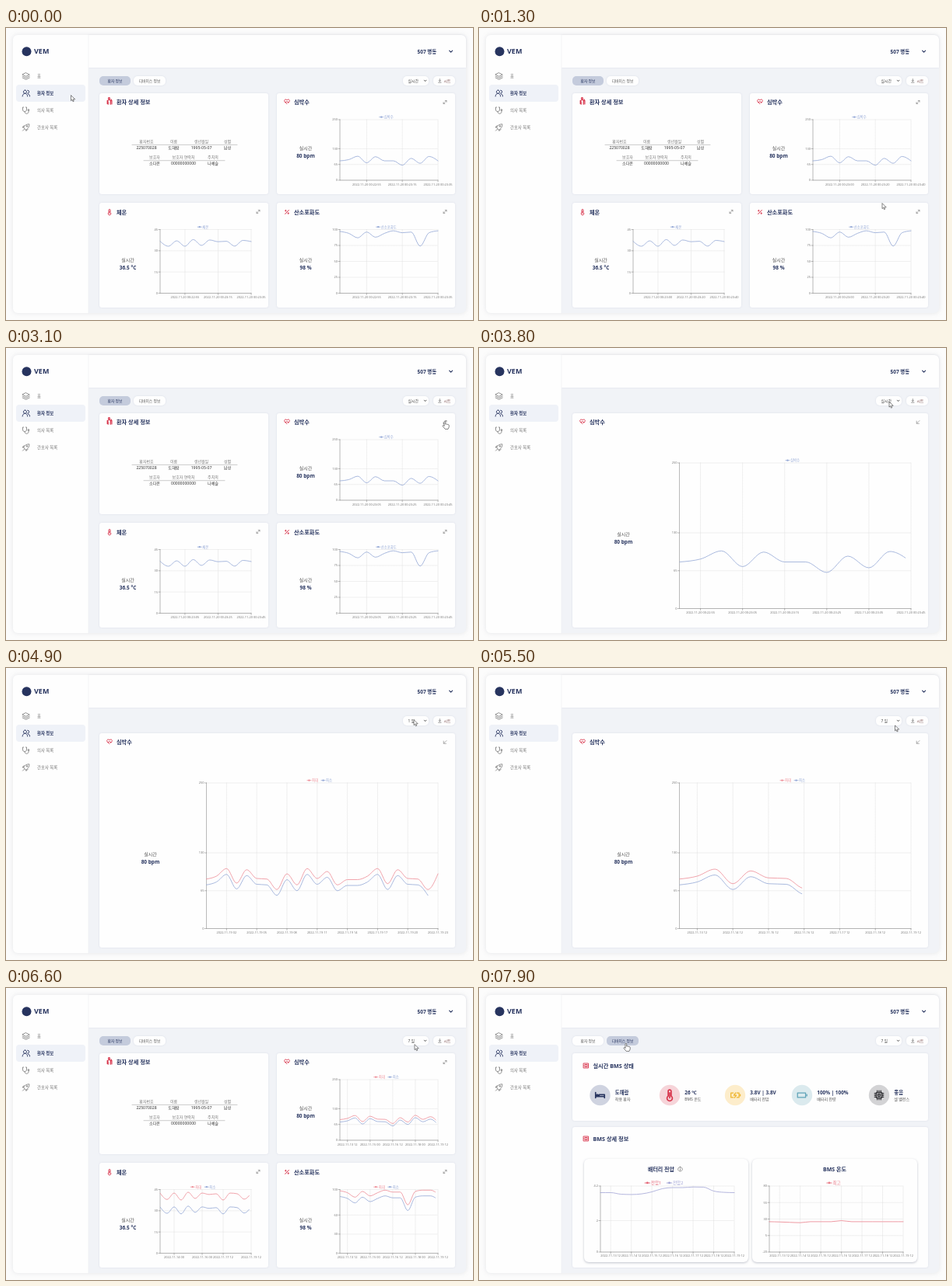
An HTML page that plays this animation: 600 px wide and 376 px high, repeating every 8000 ms.

```html
<!DOCTYPE html>
<html lang="ko">
<head>
<meta charset="utf-8">
<title>병동 모니터링</title>
<style>
  html, body { margin: 0; width: 100%; height: 100%; overflow: hidden; background: #fcfcfc; }
  svg { display: block; width: 100vw; height: 100vh; }
  text { font-family: "Noto Sans", "Noto Sans CJK KR", "Noto Sans CJK", sans-serif; }
  .card { fill: #fefefe; filter: drop-shadow(0 .4px 1px rgba(70, 85, 130, .13)); }
  .inner { fill: #fefefe; filter: drop-shadow(0 1px 1.6px rgba(50, 60, 90, .3)); }
  .window { filter: drop-shadow(0 0 3px rgba(60, 70, 90, .13)); }
  .line { fill: none; stroke-linecap: round; stroke-linejoin: round; }
</style>
</head>
<body>
<svg id="stage" viewBox="0 0 600 376"></svg>
<script>
const LOOP = 8000, STEP = 100;
const NAVY = '#27345f', GRAY = '#777', RED = '#d8354c', BLUE = '#94a8d6', PINK = '#ee8d97';
const PATIENT = '도해람', GUARDIAN = '소다온', DOCTOR = '나예슬';

// Times at which the page content changes
const ZOOM_IN = 3200, PICK_DAY = 4100, PICK_WEEK = 5300, ZOOM_OUT = 6000, DEVICE = 7800;
const DRAW_MS = 750;

const HEART = {
  name: '심박수', unit: '80 bpm', max: 250, ticks: [0, 65, 130, 250], gap: 10,
  live: [80, 85, 99, 72, 97, 80, 80, 62, 90, 70, 98, 80],
  day: [85, 90, 103, 78, 101, 86, 85, 67, 94, 75, 103, 86, 98, 75, 84, 84, 90, 103, 77, 101, 86, 85, 67, 94],
  week: [85, 90, 102, 77, 99, 87, 86, 69, 93, 75, 103, 86, 97, 74]
};
const TEMP = {
  name: '체온', unit: '36.5 °C', max: 45, ticks: [0, 15, 30, 45], gap: 9.8,
  live: [36.7, 33.2, 37, 33.2, 37.9, 33.8, 37.6, 36.4, 36.7, 33.3, 37.3, 36.5],
  week: [42.5, 38, 42.5, 37.6, 43.1, 38.7, 42.5, 41.5, 42, 37.6, 42.5, 42, 38.2, 42.5]
};
const OXYGEN = {
  name: '산소포화도', unit: '98 %', max: 100, ticks: [0, 25, 50, 75, 100], weekTicks: [0, 30, 60, 100], gap: 9,
  live: [97, 94, 87, 96, 88, 94, 98, 95, 96, 74, 95, 98],
  week: [98, 95, 88, 97, 90, 95, 99, 96, 96, 76, 97, 99, 99, 93]
};
const VOLTAGE = [3.78, 3.78, 3.68, 3.66, 3.7, 3.83, 4.03, 4.1, 4.1, 4.14, 4.13, 3.88, 3.8, 3.78];
const DEVICE_TEMP = [26, 25.6, 25, 24.5, 26, 26, 26, 27.6, 26, 26, 26, 26, 26, 26];

const pad = n => String(n).padStart(2, '0');
const every = (from, step, to) => Array.from({ length: Math.floor((to - from) / step) + 1 }, (_, i) => from + i * step);
const text = (x, y, str, size, { fill = GRAY, anchor = 'start', weight = 400 } = {}) =>
  `<text x="${x}" y="${y}" font-size="${size}" fill="${fill}" text-anchor="${anchor}" font-weight="${weight}">${str}</text>`;
const mid = (x, y, str, size, fill = GRAY, weight = 400) => text(x, y, str, size, { fill, weight, anchor: 'middle' });
const bold = (x, y, str, size) => text(x, y, str, size, { fill: NAVY, weight: 700 });
const rect = (x, y, w, h, r, attrs) => `<rect x="${x}" y="${y}" width="${w}" height="${h}" rx="${r}" ${attrs}/>`;
const card = (x, y, w, h) => rect(x, y, w, h, 3, 'class="card"');
const stroke = (d, color, width = .8, extra = '') => `<path class="line" d="${d}" stroke="${color}" stroke-width="${width}" ${extra}/>`;
const at = (x, y, body, scale = 1) => `<g transform="translate(${x} ${y}) scale(${scale})">${body}</g>`;

const ICON = {
  layers: c => stroke('M0-4.2L4.5-2 0 .3-4.5-2ZM-4.5 0L0 2.3 4.5 0M-4.5 2L0 4.3 4.5 2', c),
  users: c => stroke('M-1.2-4a2.1 2.1 0 1 1-.1 0M-4.6 4c0-5 6.6-5 6.6 0M2-3.8a2 2 0 0 1 0 4M2.8 1c1.4.3 2 1.4 2 3', c, .9),
  scope: c => stroke('M-3-4h-1.2v3c0 3.6 5 3.6 5 0v-3h-1.2M-1.7 1.8c0 3.6 5 3.2 5 0v-1.2M3.3-1.2a.9.9 0 1 1-.1 0', c),
  rocket: c => stroke('M-1.8 1.8L-3-.2C-1-3.4 1.2-4.2 4.2-4.2 4.2-1.2 3.4 1 .2 3ZM-3-.2l-1.6.2L-2.6-2.4M.2 3v1.6L2.4 2.4M-2.4 2.4L-4.2 4.2M1.4-2.2a.8.8 0 1 1-.1 0', c),
  patient: c => stroke('M-.6-3.4a1 1 0 1 1 .1 0M-1.8 3.2v-2.4l-.6-2.4 2-1.2 2 1.2-.4 2.4v2.4M2-3l.9 1.6v4.4M-2.8-1.6v4', c, 1.2),
  heart: c => stroke('M0 2.8L-3-.2c-1.4-2 1.4-4 3-1.8 1.6-2.2 4.4-.2 3 1.8L1.4 1.4M-2.4.4h1.6l.8-1 .8 1.2h1.2', c, .9),
  thermo: c => stroke('M-1 .6v-3.2a1 1 0 0 1 2 0v3.2a1.8 1.8 0 1 1-2 0M0-1.6v3.4', c, .9),
  percent: c => stroke('M2.3-2.5L-2.3 2.5M-1.6-2.4a.7.7 0 1 1-.1 0M1.7 1a.7.7 0 1 1-.1 0', c, 1),
  list: c => stroke('M-3-3h6v6h-6ZM-3 0h6M-1.5-1.5h3M-1.5 1.5h3', c, .9),
  expand: () => stroke('M-2 2L2-2M.2-2H2v1.8M-2 .2V2h1.8', '#777', .6),
  collapse: () => stroke('M2-2L-1.4 1.4M-1.8-1.4v3.2h3.2', '#777', .6),
  bed: c => stroke('M-5-3v6M-5 1.4h10M5 3v-3.6H-1V1.4M-3-.7a.8.8 0 1 1-.1 0', c, 1.4),
  bolt: c => stroke('M-2-2.6h-2.6v5.2H-2M2-2.6h2.4v5.2H2M5.7-.8v1.6M.6-2.6L-1.4.2h2.8L-.6 2.8', c, 1.1),
  battery: c => stroke('M-5-2.6h9v5.2h-9ZM5.4-.8v1.6', c, 1.1),
  chip: c => stroke('M-3-3h6v6h-6ZM-1.2-1.2h2.4v2.4h-2.4ZM-2-5v2M0-5v2M2-5v2M-2 5v-2M0 5v-2M2 5v-2M-5-2h2M-5 0h2M-5 2h2M5-2h-2M5 0h-2M5 2h-2', c, 1.1)
};
const icon = (name, x, y, color, scale) => at(x, y, ICON[name](color), scale);

// Monotone cubic through evenly spaced points
function smooth(points) {
  const h = points[1][0] - points[0][0], n = points.length;
  const s = points.slice(1).map((p, i) => (p[1] - points[i][1]) / h);
  const m = points.map((_, i) => {
    if (!i || i === n - 1) return 0;
    const a = s[i - 1], b = s[i];
    return (Math.sign(a) + Math.sign(b)) * Math.min(Math.abs(a), Math.abs(b), Math.abs(a + b) / 4);
  });
  m[0] = (3 * s[0] - m[1]) / 2;
  m[n - 1] = (3 * s[n - 2] - m[n - 2]) / 2;
  const f = v => v.toFixed(2);
  return points.reduce((d, [x, y], i) => {
    if (!i) return `M${f(x)} ${f(y)}`;
    const [px, py] = points[i - 1];
    return d + `C${f(px + h / 3)} ${f(py + m[i - 1] * h / 3)} ${f(x - h / 3)} ${f(y - m[i] * h / 3)} ${f(x)} ${f(y)}`;
  }, '');
}

function legend(center, y, series, size) {
  const k = size / 4.4, widths = series.map(s => (6 + s.name.length * 4.05) * k);
  let x = center - (widths.reduce((a, b) => a + b) + (series.length - 1) * 4 * k) / 2;
  return series.map((s, i) => {
    const item = at(x, y - 1.6 * k, stroke('M0 0h5', s.color, .8) + `<circle cx="2.5" r="1.1" fill="${s.color}"/>`, k) +
      text(x + 6 * k, y, s.name, size, { fill: s.color });
    x += widths[i] + 4 * k;
    return item;
  }).join('');
}

function chart({ x, y, w, h, min = 0, max, ticks, series, count, xTicks, label, reveal = 1, legendY, legendSize = 4.4, labelGap = 6.8 }) {
  const px = i => x + i * w / (count - 1), py = v => y + h - (v - min) / (max - min) * h;
  const grid = ticks.map(v => `M${x} ${py(v)}h${w}`).join('') + xTicks.map(i => `M${px(i)} ${y}v${h}`).join('');
  const marks = ticks.map(v => `M${x - 2} ${py(v)}h2`).join('') + xTicks.map(i => `M${px(i)} ${y + h}v2`).join('');
  return stroke(grid, '#dcdcdc', .5, 'stroke-dasharray="1 1"') +
    stroke(`M${x} ${y}v${h}h${w}` + marks, '#8c8c8c', .6) +
    ticks.map(v => text(x - 3, py(v) + 1.4, v, 3.9, { anchor: 'end' })).join('') +
    xTicks.map(i => mid(px(i), y + h + labelGap, label(i), 3.9)).join('') +
    series.filter(s => s.data).map(s => stroke(smooth(s.data.map((v, i) => [px(i), py(v)])), s.color, .8,
      reveal < 1 ? `pathLength="1" stroke-dasharray="${reveal} 2" style="stroke-linecap:butt"` : '')).join('') +
    legend(x + w / 2 - 3.2, legendY, series, legendSize);
}

const dayLabel = i => `2022-11-19 ${pad(i)}`;
const weekLabel = i => `2022-11-${13 + (i >> 1)} ${pad(i % 2 * 12)}`;
function liveLabel(t) {
  const start = 1360 + (t < 100 ? 0 : t < 1500 ? 5 : 10);
  return i => `2022-11-20 00:${pad(Math.floor((start + 5 * i) / 60))}:${pad((start + 5 * i) % 60)}`;
}

function vitalChart(vital, box, range, xTicks, t) {
  const data = vital[range];
  const low = data.map(v => v - vital.gap);
  const series = range === 'live' ? [{ name: vital.name, color: BLUE, data }] : [
    { name: '최대', color: PINK, data },
    { name: '최소', color: BLUE, data: range === 'day' ? low.slice(0, -1) : low }
  ];
  const label = { live: liveLabel(t), day: dayLabel, week: weekLabel }[range];
  const ticks = range === 'week' && vital.weekTicks || vital.ticks;
  return chart({ ...box, max: vital.max, ticks, series, count: data.length, xTicks, label, reveal: drawn(t), legendY: box.y - 1.7 });
}

function drawn(t) {
  const start = [ZOOM_IN, PICK_DAY, PICK_WEEK, ZOOM_OUT].filter(s => s <= t).pop();
  if (start === undefined) return 1;
  return 1 - Math.max(0, 1 - (t - start) / DRAW_MS) ** 2.3;
}

const reading = (x, y, value) => mid(x, y, '실시간', 6, '#555') + mid(x, y + 10, value, 6.5, NAVY, 700);
const heading = (x, y, iconName, title) => icon(iconName, x, y, RED) + bold(x + 9, y + 2.7, title, 7.2);

function table(x1, x2, y, columns) {
  return stroke(`M${x1} ${y + 2.4}H${x2}`, '#999', .5) + columns.map(([x, head, value]) =>
    mid(x, y, head, 5) + mid(x, y + 7.8, value, 5.1, '#333', 500)).join('');
}

function cardsView(t, range) {
  const live = range === 'live', wide = live ? [3, 7, 11] : every(1, 3, 13);
  const heartBox = { x: 429, y: 118, w: 126, h: 78 };
  return card(120, 84, 217, 130) + card(348, 84, 229, 130) + card(120, 225, 217, 135) + card(348, 225, 229, 135) +
    heading(133, 95, 'patient', '환자 상세 정보') + heading(361, 95, 'heart', '심박수') +
    heading(133, 237, 'thermo', '체온') + heading(361, 237, 'percent', '산소포화도') +
    icon('expand', 564, 95.5) + icon('expand', 324, 236.5) + icon('expand', 564, 236.5) +
    table(162, 297, 148, [[180.5, '환자번호', '225070028'], [215.5, '이름', PATIENT], [251, '생년월일', '1995-05-07'], [284.5, '성별', '남성']]) +
    table(177, 281, 168.3, [[191, '보호자', GUARDIAN], [228, '보호자 연락처', '00000000000'], [266, '주치의', DOCTOR]]) +
    reading(385, 157, HEART.unit) + reading(156.5, 300.5, TEMP.unit) + reading(385, 300.5, OXYGEN.unit) +
    vitalChart(HEART, heartBox, range, wide, t) +
    vitalChart(TEMP, { x: 198, y: 259.5, w: 117, h: 82 }, range, live ? wide : [2, 6, 9, 13], t) +
    vitalChart(OXYGEN, { x: 429, y: 259.5, w: 126, h: 82 }, range, wide, t) + tooltip(t, heartBox);
}

function tooltip(t, box) {
  if (t < 1600 || t >= 2700) return '';
  const [i, y] = t < 2200 ? [6, 147] : [0, 139];
  const x = box.x + i * box.w / 11, value = HEART.live[i];
  return `<circle cx="${x}" cy="${box.y + box.h * (1 - value / HEART.max)}" r="1.1" fill="#4c5f96"/>` +
    rect(x + 7, y, 45.5, 23, 1.5, 'fill="#fff" stroke="#444" stroke-width="1"') +
    text(x + 11, y + 8.4, liveLabel(t)(i), 3.8, { fill: '#444' }) + text(x + 11, y + 15.8, `심박수 : ${value}`, 3.8, { fill: BLUE });
}

function zoomView(t, range) {
  const xTicks = { live: every(1, 2, 11), day: every(2, 3, 23), week: every(1, 2, 13) }[range];
  return card(120, 84, 457, 276) + heading(133, 95, 'heart', '심박수') + icon('collapse', 564, 95.5) +
    reading(185.5, 242, HEART.unit) + vitalChart(HEART, { x: 257.5, y: 148, w: 297.5, h: 187.5 }, range, xTicks, t);
}

function deviceView() {
  const status = [
    [155.5, '#cfd3e0', 'bed', NAVY, PATIENT, '착용 환자'],
    [245, '#f6d4d9', 'thermo', RED, '26 ℃', 'BMS 온도'],
    [329, '#fdedcb', 'bolt', '#eeb52f', '3.8V | 3.8V', '배터리 전압'],
    [415, '#dbeaee', 'battery', '#5fa3b8', '100% | 100%', '배터리 잔량'],
    [514, '#d3d3d5', 'chip', '#2f2f33', '좋음', '셀 밸런스']
  ];
  const base = { y: 255, w: 172, h: 85, count: 14, xTicks: every(1, 2, 13), label: weekLabel, legendY: 253, legendSize: 5.6, labelGap: 5.6 };
  return card(120, 84, 457, 87) + card(120, 179, 457, 181) +
    heading(137.5, 100, 'list', '실시간 BMS 상태') + heading(137.5, 194, 'list', 'BMS 상세 정보') +
    status.map(([x, fill, name, color, value, note]) => `<circle cx="${x}" cy="138" r="13.2" fill="${fill}"/>` +
      icon(name, x, 138, color, name === 'thermo' ? 1.9 : 1.15) + bold(x + 19.3, 137, value, 6.4) +
      text(x + 19.3, 145, note, 5, { fill: '#555' })).join('') +
    rect(135, 220, 211, 133, 6, 'class="inner"') + rect(351, 220, 212, 133, 6, 'class="inner"') +
    mid(234, 236, '배터리 전압', 7, NAVY, 700) + mid(457, 236, 'BMS 온도', 7, NAVY, 700) +
    at(258.5, 233.2, stroke('M0-2.8a2.8 2.8 0 1 1-.1 0M0-.3v1.6M0-1.4v.1', '#555', .6)) +
    chart({ ...base, x: 156, max: 4.2, ticks: [0, 2, 4.2], series: [{ name: '전압1', color: '#e5697a' }, { name: '전압2', color: '#a3a5d6', data: VOLTAGE }] }) +
    chart({ ...base, x: 373, min: -20, max: 80, ticks: every(-20, 25, 80), series: [{ name: '최고', color: '#ea7f8b', data: DEVICE_TEMP }] });
}

function shell() {
  const items = [['layers', '홈'], ['users', '환자 정보'], ['scope', '의사 목록'], ['rocket', '간호사 목록']];
  return rect(0, 0, 600, 376, 0, 'fill="#fcfcfc"') +
    rect(9, 9, 582, 358, 6, 'fill="#f1f3f7" class="window"') +
    '<path d="M106 9h479a6 6 0 0 1 6 6v36H106Z" fill="#fefefe" style="filter:drop-shadow(0 .6px 1px rgba(70,85,130,.12))"/>' +
    '<path d="M15 9h91v358H15a6 6 0 0 1-6-6V15a6 6 0 0 1 6-6Z" fill="#fefefe"/>' + stroke('M106 9V367', '#eceef2', .6) +
    `<circle cx="26.5" cy="30.2" r="6" fill="${NAVY}"/>` + bold(36, 33.4, 'VEM', 9) +
    rect(13, 73, 89, 22, 4, 'fill="#eff2f8"') +
    items.map(([name, label], i) => {
      const y = 62 + 22 * i, on = i === 1;
      return icon(name, 25.7, y, on ? NAVY : GRAY) + text(40, y + 2, label, 5.4, { fill: on ? NAVY : GRAY, weight: on ? 600 : 400 });
    }).join('') +
    bold(528.5, 32.6, '507 병동', 6.5) + stroke('M569.6 29.2l2 2 2-2', NAVY, 1.1);
}

function toolbar(view, range) {
  const tab = (x, w, label, on) => rect(x, 62, w, 12, 5, on ? 'fill="#c4cbdc"' : 'class="card"') +
    mid(x + w / 2, 69.8, label, 4.8, on ? NAVY : '#555', 500);
  const tabs = view === 'zoom' ? '' : tab(120, 40, '환자 정보', view === 'cards') + tab(164, 41, '디바이스 정보', view === 'device');
  return tabs + rect(510, 62, 33, 12, 5, 'class="card"') +
    text(516.5, 69.7, { live: '실시간', day: '1 일', week: '7 일' }[range], 4.9, { fill: '#444' }) +
    stroke('M537.3 67.2l1.3 1.4 1.3-1.4', '#333', .8) +
    rect(549, 62, 28, 12, 5, 'class="card"') +
    stroke('M557.3 65.6v3M556.2 67.6l1.1 1.1 1.1-1.1M555.6 70.2h3.4', '#555', .6) + text(562.5, 69.7, '시트', 4.8, { fill: '#7a4d4d', weight: 500 });
}

// time, x, y
const POINTER = [
  [0, 83.5, 87], [600, 83.5, 87], [900, 270, 72], [1300, 518, 226], [1400, 518, 226], [1700, 500, 190], [1900, 500, 190],
  [2400, 449, 180], [2500, 449, 180], [2800, 564, 95], [3200, 564, 95], [3700, 527, 69.5], [3900, 527, 69.5], [4600, 524, 67],
  [5400, 524, 67], [5700, 564.5, 95], [6000, 564.5, 95], [6500, 525, 73], [6700, 525, 73], [7400, 189, 72], [LOOP, 189, 72]
];
function pointer(t, view) {
  const i = POINTER.findIndex(p => p[0] > t), [t0, x0, y0] = POINTER[i - 1], [t1, x1, y1] = POINTER[i];
  const u = (t - t0) / (t1 - t0), k = u * u * (3 - 2 * u);
  const x = x0 + (x1 - x0) * k, y = y0 + (y1 - y0) * k;
  const onIcon = x > 560 && y > 91 && y < 100;
  const onTab = view !== 'zoom' && x > 164 && x < 205 && y > 62 && y < 74;
  const shape = onIcon || onTab
    ? 'M-1 5V.2c0-1.2 1.7-1.2 1.7 0v3c.3-.6 1.5-.5 1.6.2.5-.5 1.5-.3 1.6.4.6-.3 1.3 0 1.3.8v2.2L4 9.4H.2L-2.8 5.8c-.6-1 .6-1.8 1.8-.8Z'
    : 'M0 0v6.6l1.5-1.4 1 2.5 1.2-.5-1-2.4h2.1Z';
  return at(x, y, stroke(shape, '#333', .6, 'style="fill:#fff"'));
}

const stage = document.getElementById('stage');
let shown = -1;
function render(now) {
  const t = Math.floor(now % LOOP / STEP) * STEP;
  if (t !== shown) {
    shown = t;
    const view = t >= DEVICE ? 'device' : t >= ZOOM_IN && t < ZOOM_OUT ? 'zoom' : 'cards';
    const range = t < PICK_DAY ? 'live' : t < PICK_WEEK ? 'day' : 'week';
    const page = { cards: cardsView, zoom: zoomView, device: deviceView }[view];
    stage.innerHTML = shell() + toolbar(view, range) + page(t, range) + pointer(t, view);
  }
}

const begin = performance.now();
function tick() {
  render(performance.now() - begin);
  requestAnimationFrame(tick);
}
tick();
</script>
</body>
</html>
```
